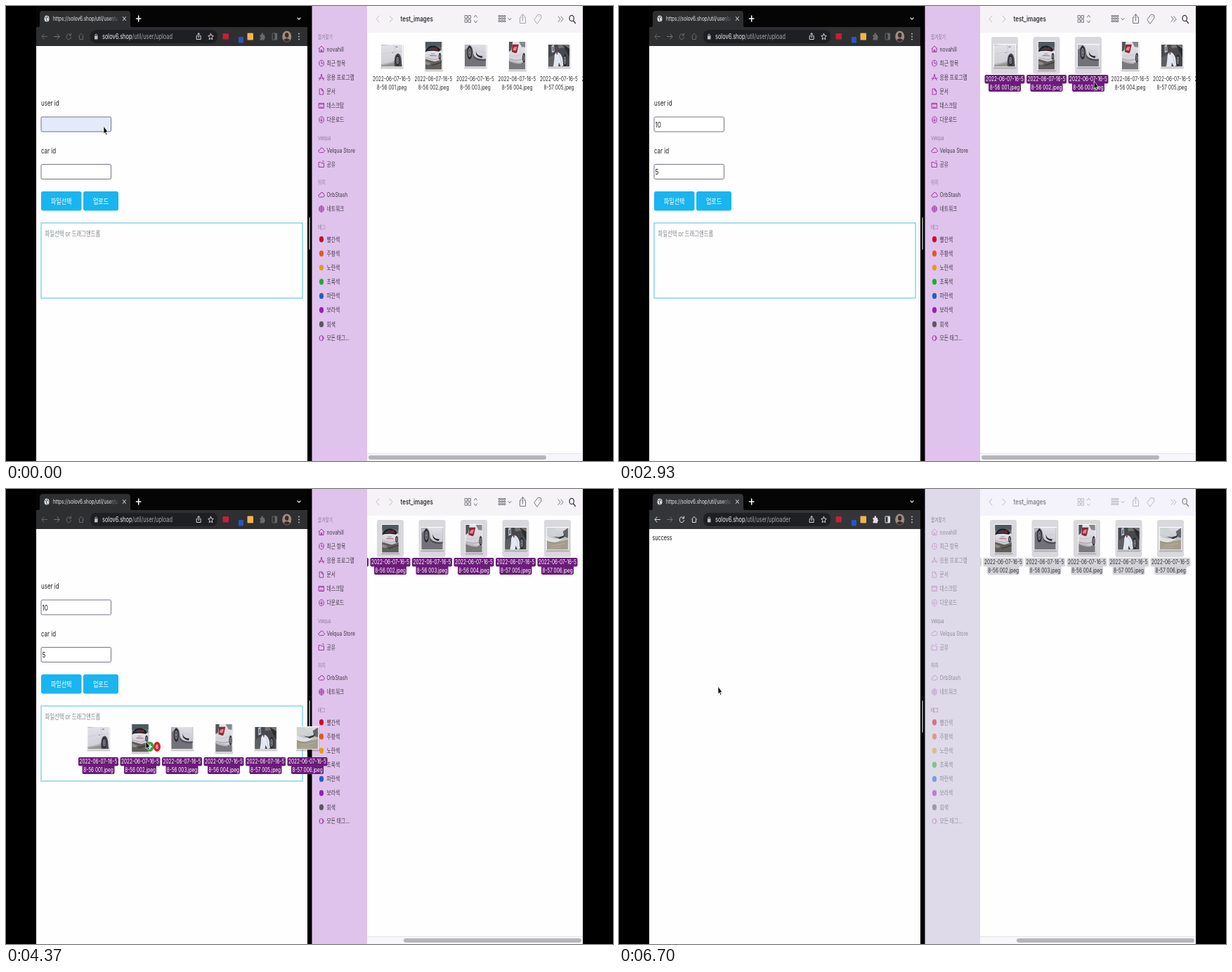
Write an HTML page that moves like this. It is 864 px wide and 648 px high and loops after 6800 ms.

```html
<!DOCTYPE html>
<html lang="ko">
<head>
<meta charset="utf-8">
<title>Upload demo</title>
<style>
html, body { margin: 0; width: 100%; height: 100%; overflow: hidden; background: #000; }
svg { display: block; }
#stage {
  font-family: Inter, "Noto Sans CJK KR", "Noto Sans CJK", sans-serif;
  --side: #dedaea; --text: #938e9b; --head: #8b8691; --icon: #c9a3cd; --tool: #bdbac3;
  --bar: #f4f2fa; --title: #88858d; --dot: .5; --sel: #d4d3d8; --selText: #303034;
  --nav: #dedfe1; --chrome: #343538;
}
#stage.finder {
  --side: #dfc3ec; --text: #443a4a; --head: #91799b; --icon: #a1369f; --tool: #77747b;
  --bar: #f6f3f7; --title: #39373b; --dot: 1; --sel: #6b1c79; --selText: #fff;
  --nav: #68696c; --chrome: #2e2f31;
}
.file .bg, .file .lab { fill: none; }
.file text { fill: #2b2b2d; }
.sel .bg { fill: #d9d8dd; }
.sel .lab { fill: var(--sel); }
.sel text { fill: var(--selText); }
#drag .bg { fill: none; }
#drag .lab { fill: #6b1c79; }
#drag text { fill: #fff; }
.line { fill: none; stroke-width: 1; stroke-linecap: round; stroke-linejoin: round; }
</style>
</head>
<body>
<svg id="stage" width="864" height="648" viewBox="0 0 864 648"></svg>
<script>
const LOOP = 6800;
const SQUEEZE = 0.75;
const STEP = 59.5, SCROLL = 61.5;
const stage = document.getElementById('stage');

const rect = (x, y, w, h, fill, r = 0, more = '') =>
  `<rect x="${x}" y="${y}" width="${w}" height="${h}" rx="${r}" fill="${fill}" ${more}/>`;
const oval = (x, y, rx, ry, fill, more = '') =>
  `<ellipse cx="${x}" cy="${y}" rx="${rx}" ry="${ry}" fill="${fill}" ${more}/>`;
const shape = (d, fill) => `<path d="${d}" fill="${fill}"/>`;
const poly = (points, fill) => `<polygon points="${points}" fill="${fill}"/>`;
const line = (d, stroke, more = '') => `<path class="line" d="${d}" stroke="${stroke}" ${more}/>`;
const text = (x, y, size, fill, str, more = '') =>
  `<text transform="translate(${x} ${y}) scale(${SQUEEZE} 1)" font-size="${size}" ${fill ? `fill="${fill}"` : ''} ${more}>${str}</text>`;
const group = (id, body, more = '') => `<g id="${id}" ${more}>${body}</g>`;
const MID = 'text-anchor="middle"';

// Simplified car photos: the square 0..100 is the preview crop, thumbnails show a margin around it
const wheel = (x, y, rx, ry) => oval(x, y, rx, ry, '#2b2b30') + oval(x, y, rx * .62, ry * .64, '#85848c') +
  oval(x, y, rx * .42, ry * .44, '#5b5a62') + oval(x, y, rx * .15, ry * .15, '#a9a8ae');
const ground = fill => rect(-20, -20, 140, 140, fill);
const stroke = (d, color, width) => line(d, color, `style="stroke-width:${width}"`);
const photos = [
  ground('url(#paint)') + shape('M-20-20H120V-4L60-1L-20 2Z', '#75767e') +
    stroke('M-20 44Q40 34 120 30', '#c3c1cd', 2) + stroke('M66 0Q73 30 64 76', '#aaa8b4', 1.2) +
    shape('M70 10Q80 6 91 10Q82 15 70 10', '#777782') + oval(56, 37, 4, 1.500, '#54545e') +
    shape('M-20 90Q40 84 70 72V78L62 88L-20 98Z', '#b0aeb9') + shape('M-20 96L64 84L120 90V120H-20Z', '#96938f') +
    shape('M66 92Q66 42 90 40Q110 42 112 80V100H70Z', '#4a4950') + wheel(87, 72, 15, 25),
  ground('#686b70') + shape('M-20-20H120V14L70 2L-20 12Z', '#515960') +
    shape('M0 30Q12 4 42 2Q78 2 92 22L84 32L48 28L6 34Z', '#1d1e22') + shape('M14 24Q26 10 48 9L66 21L44 22Z', '#3d4148') +
    shape('M-6 36L12 28L48 27L84 30L96 24L108 40V58L92 73L60 80L-6 66Z', 'url(#paint)') +
    shape('M48 12L70 10L78 23L56 24Z', '#6c2a32') + stroke('M28 50L68 51', '#a83347', 3) + rect(34, 38, 24, 7, '#bcbac1', 1) +
    stroke('M0 60L60 70L84 62', '#8f8d94', 2) + wheel(89, 54, 8, 16) +
    shape('M-20 62L56 80L92 72L120 64V120H-20Z', '#605d5b') + shape('M-20 72L34 86L22 96L-20 90Z', '#8f8b87') +
    stroke('M40 98L120 78', '#393836', 4),
  ground('#73717a') + shape('M-20-20H26V16Q10 6-6 18L-20 26Z', '#b6b6be') + wheel(14, 36, 16, 32) +
    shape('M18-20H120V64Q76 74 54 62Q36 50 36 30Q32 10 18 0Z', 'url(#paint)') +
    shape('M53 30L60 42Q74 54 96 52L92 61Q68 60 56 46Z', '#25262c') + stroke('M40 14Q60 34 100 32', '#bab8c3', 1.500) +
    shape('M36 46Q52 70 120 66V72Q64 78 40 60Z', '#4d4b53'),
  ground('url(#paint)') + shape('M-20-20H24L14 24L-20 42Z', '#50545b') + shape('M60-20H120V12L78 8Z', '#858890') +
    shape('M20-4L60-4L50 32Q46 40 38 38L17 32Z', '#972536') + shape('M28 12Q42 2 50 8L43 26L24 24Z', '#d28c95') +
    stroke('M-20 48Q50 60 92 38', '#b9b2b7', 2) + stroke('M0 66Q50 80 88 66', '#7c767d', 2.500) +
    wheel(92, 62, 10, 24) + shape('M-20 68Q50 84 84 84L120 84V120H-20Z', '#7b797d') + shape('M0 70Q44 84 80 82L72 90Q30 90 0 76Z', '#bdb8ba'),
  ground('#48494e') + shape('M40-20H120V30L78 14L48 18Z', '#74736f') + shape('M76 0L120 20V60L98 34Z', '#2c2d32') +
    shape('M4 4L19 0L22 32L5 38Z', '#c4cad2') + shape('M9 10L16 8L18 27L10 30Z', '#59616a') +
    shape('M-20 60L20 46L16 100V120H-20Z', '#5f5f63') +
    shape('M22 48Q32 30 48 36Q66 42 76 70L78 96L62 100L50 82L46 100H14Q20 80 22 48Z', '#e3e7f0') +
    stroke('M50 46Q64 62 64 92', '#b2bac7', 2) + shape('M33 36L43 34L41 46L36 45Z', '#9e2a39') + wheel(88, 72, 13, 27),
  ground('#bfc2c3') + shape('M-20-20H120V34L66 46L-20 42Z', 'url(#paint)') + shape('M-20-20H22L52 26L34 40L-20 26Z', '#d0d3d4') +
    shape('M84 18L120 0V48L94 42Z', '#5f6467') + shape('M-20 56L42 68L120 54V120H-20Z', '#a49d8b') +
    shape('M-20 36Q26 56 58 48L90 42L72 60Q34 76-20 60Z', '#dfe1e1') + shape('M24 40L56 44L86 38L96 28L92 44L66 52Z', '#33373a') +
    stroke('M-20 62Q34 78 74 60', '#6f6e66', 2) + stroke('M10 84L96 72M0 96L70 88', '#bdb6a4', 3),
];
const photo = (i, x, y, w, h, box = '0 0 100 100') =>
  `<svg x="${x}" y="${y}" width="${w}" height="${h}" viewBox="${box}" preserveAspectRatio="none">${photos[i]}</svg>`;

function file(i) {
  const x = 549 + STEP * i, tall = i === 1 || i === 3;
  const w = tall ? 24 : 31, h = tall ? 40 : 32;
  const box = tall ? '0 -17 100 134' : '-17 0 134 100';
  return `<g class="file">
    <rect class="bg" x="${x - 19}" y="44" width="38" height="53" rx="3"/>
    ${rect(x - w / 2 - .4, 71 - h / 2 + .8, w + 1.6, h + 1.6, '#0003')}
    ${rect(x - w / 2 - .6, 70 - h / 2, w + 1.2, h + 1.2, '#fff')}
    ${photo(i, x - w / 2 + .4, 71 - h / 2, w - .8, h - .8, box)}
    <rect class="lab" x="${x - 28.5}" y="98" width="57" height="12.5" rx="2"/>
    <rect class="lab" x="${x - 23}" y="109" width="46" height="13" rx="2"/>
    ${text(x, 107.3, 8.6, '', '2022-06-07-16-5', MID)}
    ${text(x, 119.1, 8.6, '', `8-5${i > 3 ? 7 : 6} 00${i + 1}.jpeg`, MID)}</g>`;
}
const files = photos.map((_, i) => file(i)).join('');

function browser() {
  const nav = 'var(--nav)', pale = '#d6d7d9';
  return rect(43, 0, 386, 57, '#050505') +
    shape('M45 31Q48 30 48 27V12Q48 7 52 7H173Q177 7 177 12V27Q177 30 180 31Z', 'var(--chrome)') +
    rect(43, 30, 386, 27, 'var(--chrome)') + rect(120, 34, 181, 19, '#1e1f22', 8) +
    group('globe', oval(58, 18, 3.5, 4.5, '#dfe0e2') + line('M55.5 16l2 1v2l1 3M59 14l-1 2 2 1', '#4c4d50')) +
    text(67, 21, 8.6, 'url(#fade)', 'https://solov6.shop/util/user/u') +
    line('M166.4 15.5l4 5M170.4 15.5l-4 5', '#e6e6e6') + line('M188.7 14v8M185.5 18h6.4', '#fff', 'style="stroke-width:1.5"') +
    line('M415 17l2 2 2-2', '#ddd', 'style="stroke-width:1.3"') +
    line('M58.5 43.5h-7M54 39.8l-3 3.7 3 3.7', nav) + line('M68.5 43.5h7M73 39.8l3 3.7-3 3.7', '#77787b') +
    group('reload', line('M92 41.5a3.2 4 0 1 0 .5 3M92.5 39v3h-2.6', nav)) +
    group('stop', line('M86.5 40l5 7M91.5 40l-5 7', nav, 'style="stroke-width:1.3"')) +
    line('M103.5 43l3.5-3.7 3.5 3.7M104.5 43v4.5h5V43', nav) +
    rect(126, 42.5, 4.5, 5, '#bfc0c3', .7) + line('M127 42.5v-1.5q1.3-2.5 2.6 0v1.5', '#bfc0c3') +
    text(137, 46.8, 9.9, '#f1f1f2', 'solov6.shop<tspan id="path" fill="#a4a5a8"></tspan>') +
    line('M272.5 42.5h-1.3v5h6v-5h-1.3M274.2 45v-6M272.5 40.5l1.7-2 1.7 2', pale) +
    line('M291.5 39.3l1.1 2.8 2.6.3-2 2.2.6 3.2-2.3-1.6-2.3 1.6.6-3.2-2-2.2 2.6-.3z', pale) +
    rect(308.5, 39, 8.5, 8.5, '#c51f38', 1) + rect(331, 44, 7, 8.5, '#2b55c5', 1) + rect(343.5, 38.5, 8.5, 10, '#f0b548', 1) +
    shape('M361.5 41h2v-2q1.3-1.5 2.5 0v2h2v2.5q2.3 1 0 2.5v2.5h-6.500V46q2-1.3 0-2.5z', nav) +
    rect(379, 39, 6.5, 9, 'none', .5, 'stroke="var(--nav)"') + rect(382.5, 39, 3, 9, nav) +
    oval(399.7, 43.5, 6.5, 8, '#9c8d84') + oval(399.7, 41.5, 2.7, 3.5, '#3c2c29') +
    shape('M395 48.5q4.7-5 9.4 0q-4.7 5-9.4 0', '#3c2c29') +
    [39.5, 43.5, 47.5].map(y => oval(417, y, .8, 1, pale)).join('');
}

const field = (id, y) =>
  rect(50, y, 99.5, 21, '#fff', 1.8, `id="${id}" stroke="#77718a"`) +
  group(id + 'Spin', rect(139.5, y + 3, 8, 15, '#efedf0') +
    poly(`141,${y + 7.5} 145,${y + 7.5} 143,${y + 4.5}`, '#4d4d4d') +
    poly(`141,${y + 13.5} 145,${y + 13.5} 143,${y + 16.5}`, '#4d4d4d')) +
  text(51.5, y + 14.6, 10.8, '#1c1c1c', '', `id="${id}Text"`) +
  rect(0, y + 4.5, .8, 13, '#111', 0, `id="${id}Caret"`);

function form() {
  const previews = [0, 3, 2, 5, 4, 1].map((p, i) => {
    const x = 58.5 + 86.5 * (i % 4), y = 320.5 + 93.5 * (i > 3);
    return photo(p, x, y, 80.5, 86) + rect(x, y, 80.5, 86, 'none', 0, 'stroke="#4b3bb0"') +
      text(x + 72.5, y + 79.5, 10.5, '#e0142c', 'X', MID);
  }).join('');
  return text(50, 142, 10.6, '#222', 'user id') + field('user', 158) +
    text(50, 209.5, 10.6, '#222', 'car id') + field('car', 225.5) +
    rect(108.5, 262.5, 53.5, 30.5, '#b9cff6', 4, 'id="halo"') +
    rect(50, 264, 57.5, 27.5, '#19b5f0', 3) + rect(110, 264, 50, 27.5, '#19b5f0', 3) +
    text(78.7, 281.7, 10.7, '#fff', '파일선택', MID) + text(135, 281.7, 10.7, '#fff', '업로드', MID + ' id="send"') +
    rect(50, 309, 372, 107, 'none', 0, 'id="zone" stroke="#6bc9e6" stroke-width="1.2"') +
    text(55.5, 328, 9.8, '#85818b', '파일선택 or 드래그앤드롭', 'id="hint"') + group('previews', previews);
}

const ring = 'M-3.3 0a3.3 4.3 0 1 0 6.6 0a3.3 4.3 0 1 0-6.6 0';
const sideIcons = {
  home: 'M-4-.5L0-4.5 4-.5M-3-1v5h6v-5M-.7 4V1H.7v3', clock: ring + 'M0-2.5V.5H2',
  apps: 'M-3 4L.5-4M3 4L-.5-4M-4 1.5H4', doc: 'M-2.5-4H.7L2.7-1.5V4H-2.5zM.5-4v2.7h2',
  desk: 'M-3.5-3.5h7v7h-7zM-3.5-2h7M-2 2h4', down: ring + 'M0-2V2M-1.3.5L0 2 1.3.5',
  cloud: 'M-3 3q-2-1-1-3 1-1 2-1 1-4 4-2 1 1 1 2 2 1 1 3-.5 1-1.5 1z',
  share: 'M-3.5-3h2.5l1 1.3h3.5V4h-7zM1.5-4.5h2',
  net: ring + 'M-3 0H3M0-4V4M-2.5-2h5M-2.5 2h5', tags: 'M-3 0a2.5 3.5 0 1 0 5 0a2.5 3.5 0 1 0-5 0M1-3.5q5 3.5 0 7',
};
function sidebar() {
  const heads = [['즐겨찾기', 44], ['Velqua', 188.5], ['위치', 251.5], ['태그', 315]];
  const rows = [['home', 'novahill', 61.5], ['clock', '최근 항목', 81.5], ['apps', '응용 프로그램', 101.5], ['doc', '문서', 122],
    ['desk', '데스크탑', 142], ['down', '다운로드', 162], ['cloud', 'Velqua Store', 205.5], ['share', '공유', 225.5],
    ['cloud', 'OrbStash', 269], ['net', '네트워크', 289], ['tags', '모든 태그...', 473]];
  const tags = [['빨간색', '#d2062c'], ['주황색', '#e25a14'], ['노란색', '#e79a18'], ['초록색', '#20ad30'],
    ['파란색', '#1c60cc'], ['보라색', '#981fc1'], ['회색', '#5e5663']];
  const label = (y, s) => text(456.5, y + 3.3, 9, 'var(--text)', s);
  return rect(435.5, 0, 78.5, 648, 'var(--side)') +
    heads.map(([s, y]) => text(444, y + 2.8, 7.6, 'var(--head)', s)).join('') +
    rows.map(([icon, s, y]) => line(sideIcons[icon], 'var(--icon)', `transform="translate(449 ${y})"`) + label(y, s)).join('') +
    tags.map(([s, fill], i) => oval(449, 332.3 + 20.15 * i, 3.1, 4.2, fill, 'style="opacity:var(--dot)"') +
      label(332.3 + 20.15 * i, s)).join('');
}

function finder() {
  const tool = d => line(d, 'var(--tool)');
  const grid = (x, y, n, w, h, gap) => Array.from({ length: n * n }, (_, k) =>
    `M${x + (k % n) * gap} ${y + Math.floor(k / n) * (h + 1.8)}h${w}v${h}h-${w}z`).join('');
  return rect(514, 0, 307, 648, '#fefefe') + sidebar() +
    rect(514, 0, 307, 38, 'var(--bar)') +
    line('M531 14l-4 4.5 4 4.5M546 14l4 4.5-4 4.5', '#bfb9c4') +
    text(561.5, 22.2, 10.6, 'var(--title)', 'test_images', 'font-weight="600"') +
    tool(grid(653.5, 13.5, 2, 3, 4, 5)) + tool('M666.5 16l2-3 2 3M666.5 21l2 3 2-3') +
    tool(grid(701.5, 13.5, 3, 2, 1.8, 3.7)) + tool('M715 17.5l2 2.5 2-2.5') +
    group('actions', tool('M733.5 16h-2v8.5h8V16h-2M735.5 21v-9M733 14.5l2.5-3 2.5 3') +
      tool('M752 19l5.5-7 4 1 .5 4-6 8zM759 15v.3')) +
    tool('M786 15l3 3.7-3 3.7M790 15l3 3.7-3 3.7') +
    line('M802 17.5a3.2 4.2 0 1 0 6.4 0a3.2 4.2 0 1 0-6.4 0M807.6 21l2.8 3.5', 'var(--title)', 'style="stroke-width:1.3"') +
    `<g clip-path="url(#pane)">${group('list', files)}</g>` +
    rect(514, 637.5, 307, 10.5, '#f7f6fa') + rect(514, 637.3, 307, .8, '#dedbe6') +
    rect(516, 640, 253, 6, '#b6b5b8', 3, 'id="thumb"');
}

stage.innerHTML = `<defs>
  <linearGradient id="fade" gradientUnits="userSpaceOnUse" x1="104" x2="126" y1="0" y2="0">
    <stop stop-color="#e9e9ea"/><stop offset="1" stop-color="#e9e9ea" stop-opacity=".1"/></linearGradient>
  <linearGradient id="paint" x1="0" x2="0" y1="0" y2="1">
    <stop stop-color="#e6e5ea"/><stop offset="1" stop-color="#c9c7d0"/></linearGradient>
  <clipPath id="pane"><rect x="514" y="38" width="307" height="599"/></clipPath></defs>` +
  rect(0, 0, 864, 648, '#000') + rect(43, 57, 386, 591, '#fefefe') + browser() +
  group('form', form()) + text(47.5, 73, 9.6, '#151515', 'success', 'id="success"') +
  finder() + rect(431, 301, 2, 46, '#858585', 1) + group('drag', files) +
  group('cursor',
    group('badge', oval(6, 8, 5.5, 7, '#2ca637') + line('M6 5v6M3.5 8h5', '#fff', 'style="stroke-width:1.4"') +
      oval(16, 8, 5, 7, '#d4202b') + text(16, 11, 8, '#fff', '6', MID + ' font-weight="600"')) +
    group('arrow', '<path d="M0 0V11L2 9.1 3.3 12.6 4.8 11.9 3.5 8.5H6Z" fill="#050505" stroke="#fff" stroke-width=".7"/>') +
    group('hand', '<path d="M0 0q1-1 1.5 0V4l4 1.5V9L4.5 12H0L-3 7.5q0-1.7 1.5-.5L0 8.5Z" fill="#fff" stroke="#111" stroke-width=".9"/>'));

const el = Object.fromEntries([...stage.querySelectorAll('[id]')].map(n => [n.id, n]));
const listFiles = [...el.list.children];
const show = (id, on) => el[id].setAttribute('visibility', on ? 'inherit' : 'hidden');
const set = (id, name, value) => el[id].setAttribute(name, value);
const ease = (t, a, b) => { const p = Math.min(1, Math.max(0, (t - a) / (b - a))); return p * p * (3 - 2 * p); };

// Cursor stops: start time, end time, x, y
const moves = [
  [150, 350, 110, 168], [880, 1180, 98, 236], [2150, 2550, 526, 140], [2650, 3200, 817, 76],
  [3560, 3820, 555, 75], [3900, 4340, 199, 359], [4750, 5250, 141, 281],
];
function cursorAt(t) {
  let x = 139, y = 171;
  for (const [a, b, tx, ty] of moves) {
    const p = ease(t, a, b);
    x += (tx - x) * p;
    y += (ty - y) * p;
  }
  return [x, y];
}

function updateField(id, focused, value, caret) {
  set(id, 'stroke', focused ? '#94489a' : '#77718a');
  set(id, 'stroke-width', focused ? 1.6 : 1);
  show(id + 'Spin', focused);
  el[id + 'Text'].textContent = value;
  show(id + 'Caret', focused && caret);
  set(id + 'Caret', 'x', 52 + value.length * 4.7);
}

function draw(t) {
  const within = (a, b) => t >= a && t < b;
  const dropped = t >= 4620, sent = t >= 5560, done = t >= 6150;
  const [x, y] = cursorAt(t);
  stage.setAttribute('class', within(380, 2600) || sent ? '' : 'finder');

  updateField('user', within(380, 1230), t < 600 ? '' : t < 760 ? '1' : '10', (t - 800) % 1000 < 500);
  updateField('car', within(1230, 2600), t < 1700 ? '' : '5', (t - 1230) % 1000 < 500);
  set('user', 'fill', t < 380 ? '#e3eafa' : '#fff');
  set('zone', 'height', dropped ? 202.5 : 107);
  show('hint', !dropped);
  show('previews', dropped);
  show('halo', sent);
  set('send', 'fill', sent ? '#24506f' : '#fff');
  show('form', !done);
  show('success', done);
  el.path.textContent = done ? '/util/user/uploader' : '/util/user/upload';
  const loading = sent && !done;
  show('globe', !loading);
  show('reload', !loading);
  show('stop', loading);

  const scroll = ease(t, 3050, 3400);
  set('list', 'transform', `translate(${-SCROLL * scroll} 0)`);
  set('thumb', 'x', 516 + 50 * scroll);
  set('actions', 'opacity', t < 2700 ? .6 : 1);
  listFiles.forEach((f, i) => {
    const reached = t >= 2650 && x + SCROLL * scroll > 530 + STEP * i;
    f.setAttribute('class', t >= 3400 || reached ? 'file sel' : 'file');
  });

  const dragging = within(3900, 4620);
  show('drag', dragging);
  set('drag', 'transform', `translate(${x - 555 - SCROLL} ${y - 75})`);
  show('badge', dragging);
  show('cursor', !within(560, 860) && !within(1600, 2150));
  set('cursor', 'transform', `translate(${x} ${y})`);
  const pointing = within(5150, 6150);
  show('hand', pointing);
  show('arrow', !pointing);
}

const start = performance.now();
function tick() {
  draw((performance.now() - start) % LOOP);
  requestAnimationFrame(tick);
}
draw(0);
requestAnimationFrame(tick);
</script>
</body>
</html>
```
